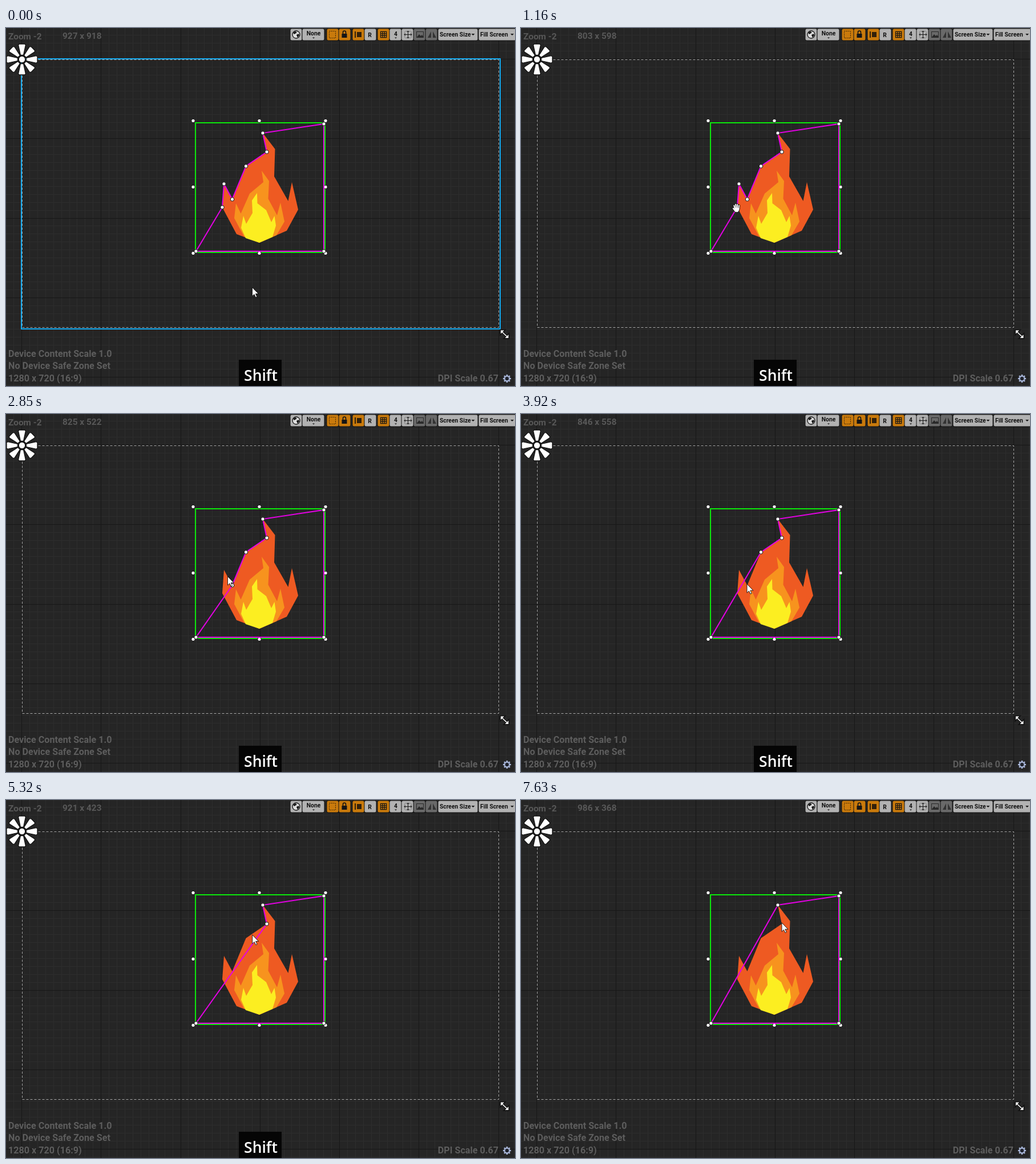
Animation of 892x627 px, one loop 7.71 s. Source, as an HTML page:

```html
<!DOCTYPE html>
<html lang="en">
<head>
<meta charset="utf-8">
<title>Editing a polygon outline</title>
<style>
  html, body { margin: 0; width: 100%; height: 100%; overflow: hidden; background: #252525; }
  svg { display: block; }
  text { font-family: Roboto, sans-serif; font-weight: 700; }
  .info { fill: #5d5d5d; font-size: 16.15px; }
  .top { fill: #585858; font-size: 15.4px; }
  .tool { fill: #111; font-size: 10.3px; }
  .key { fill: #fff; font: 600 26.5px "Open Sans", "Noto Sans", sans-serif; }
  .dot { fill: #fff; stroke: #111; stroke-width: 1; }
  .cursor { stroke-linejoin: round; stroke-linecap: round; }
</style>
</head>
<body>
<svg id="stage" width="892" height="627" viewBox="0 0 892 627"></svg>
<script>
const LOOP = 7710, STEPS = 100;
const INK = '#151515';
const stage = document.getElementById('stage');

function add(tag, attrs, parent = stage) {
  const el = document.createElementNS('http://www.w3.org/2000/svg', tag);
  for (const key in attrs) el.setAttribute(key, attrs[key]);
  parent.appendChild(el);
  return el;
}
const path = (d, attrs, parent) => add('path', { d, fill: 'none', ...attrs }, parent);
const box = (x, y, width, height, attrs, parent) =>
  add('rect', { x, y, width, height, ...attrs }, parent);
const frame = (x, y, w, h, stroke, attrs) => box(x, y, w, h, { fill: 'none', stroke, ...attrs });
const dot = (cx, cy) => add('circle', { cx, cy, r: 3.2, class: 'dot' });
const show = (el, on) => { el.style.display = on ? '' : 'none'; };
function label(x, y, str, cls, anchor = 'start') {
  const el = add('text', { x, y, class: cls, 'text-anchor': anchor });
  el.textContent = str;
  return el;
}

// Every tenth line of the background grid is dark
function drawGrid() {
  let minor = '', major = '';
  for (let k = -4; k < 64; k++) {
    const x = Math.round(27 + k * 13.925) + 0.5;
    const y = Math.round(54 + k * 13.925) + 0.5;
    const d = `M${x} 0V627M0 ${y}H892`;
    if (k % 10) minor += d; else major += d;
  }
  path(minor, { stroke: '#2d2d2d' });
  path(major, { stroke: '#171717' });
}

// One row of buttons, a colour letter for each
function buttons(left, letters, width = 21) {
  const colors = { l: '#b2b2b2', o: '#c97a0c', d: '#696969' };
  box(left - 0.5, 0.5, width * letters.length + 1, 22, { rx: 4, fill: INK });
  [...letters].forEach((c, i) =>
    box(left + i * width + 0.5, 1.5, width - 1, 20, { rx: 2.5, fill: colors[c] }));
}
const caret = (x, y, s) => path(`M${x - s} ${y}h${2 * s}l${-s} ${s}z`, { fill: INK });

function drawToolbar() {
  buttons(498, 'l');
  buttons(519, 'l', 39);
  buttons(562, 'oo');
  buttons(607, 'ol');
  buttons(651, 'olldd');
  buttons(757, 'l', 70);
  buttons(828, 'l', 66);
  label(539, 13, 'None', 'tool', 'middle');
  label(637.5, 15.5, 'R', 'tool', 'middle');
  label(683, 13.5, '4', 'tool', 'middle');
  label(760, 15, 'Screen Size', 'tool');
  label(831, 15, 'Fill Screen', 'tool');
  caret(539, 16.5, 2);
  caret(683, 16.5, 2);
  caret(818.5, 10, 3);
  caret(887, 10, 3);

  // globe, dashed frame, padlock, layout block
  add('circle', { cx: 508.5, cy: 11.5, r: 6.5, fill: '#ddd', stroke: INK, 'stroke-width': 1.3 });
  path('M503 8l4-2 3 2-5 3zM509 12l4-2 1 3-3 4z', { fill: INK });
  frame(566.5, 5.5, 11, 12, '#3a2408', { 'stroke-dasharray': '2 1.5' });
  box(588.5, 10, 9, 7, { fill: INK });
  path('M590.5 10V7.5a2.5 2.5 0 0 1 5 0V10', { stroke: INK, 'stroke-width': 1.6 });
  box(611, 6, 2, 11, { fill: '#33210a' });
  box(615, 7, 8, 9, { fill: '#33210a' });

  // snap grid, move, picture, mirror
  for (let i = 0; i < 4; i++) {
    const p = i * 3.4;
    path(`M656 ${6.4 + p}h11.2M${656.5 + p} 6v11`, { stroke: INK, 'stroke-width': 1.2 });
  }
  frame(698.5, 5.5, 12, 12, '#777', { rx: 2, 'stroke-width': 0.8 });
  for (let i = 0; i < 4; i++)
    path('M0 0V-6.5M-2 -4.5L0 -6.5 2 -4.5',
      { stroke: INK, transform: `translate(704.5 11.5) rotate(${i * 90})` });
  frame(719.5, 6.5, 12, 10, '#292929');
  path('M720 16l4-5 3 3 2-2 3 4z', { fill: '#292929' });
  path('M745 6v11h-6zM748 6v11h6z', { fill: '#333' });
}

function drawAnchor() {
  const g = add('g', { transform: 'translate(28 55)', stroke: '#111', 'stroke-width': 1.3 });
  for (let i = 0; i < 8; i++)
    path('M-2.6 -7.5L-6.4 -25 -5 -27H5L6.4 -25 2.6 -7.5z',
      { fill: '#fff', transform: `rotate(${i * 45})` }, g);
  add('circle', { r: 5.8, fill: '#fff' }, g);
}

function drawCorner() {
  const heads = 'M867 529.5h6l-6 6zM880.5 543h-6l6-6z';
  path('M869.5 532.5l8 7.5' + heads, { stroke: '#111', 'stroke-width': 3.5 });
  path('M869.5 532.5l8 7.5', { stroke: '#fff', 'stroke-width': 1.7 });
  path(heads, { fill: '#fff' });
  const gear = add('g', { transform: 'translate(878 614)', stroke: '#a9b7da' });
  for (let i = 0; i < 8; i++)
    path('M0 -4.5V-7', { 'stroke-width': 2.6, transform: `rotate(${i * 45})` }, gear);
  add('circle', { r: 4.2, fill: '#20242e', 'stroke-width': 2 }, gear);
}

// The outline runs round the image frame, then down the left edge of the flame
const edge = [[450, 184], [457, 217], [420.5, 242], [396.5, 300], [382, 273], [379, 314]];
const corners = [[333, 391], [557, 391], [557, 168], ...edge];

function drawFlame() {
  const fill = (color, points) => add('polygon', { points, fill: color });
  fill('#ee5a22', edge + ' 404,361 444,376 492,355 512,318 501,270 494.5,303 470,260 471.5,212');
  fill('#f7931e', '444,376 417,365 400,333 403,307 411.5,325 427,290 451,270 448,250 461,268 459.5,299 475,328 481,306 488,339 474,363');
  fill('#fcee21', '444,376 420,368 412,350 416,329 421,343 432,324 431,302 440,289 440.5,307 456,319 465,340 470.5,329 473,346 467,366');
}

drawGrid();
const hover = frame(27, 54, 839, 473, '#13aaf0', { 'stroke-width': 2 });
frame(28.5, 55.5, 835, 469, '#a9a9a9', { 'stroke-dasharray': '4 3' });
drawAnchor();
label(4, 19.5, 'Zoom -2', 'info top');
const readout = label(99, 18.5, '', 'info top');
['Device Content Scale 1.0', 'No Device Safe Zone Set', '1280 x 720 (16:9)']
  .forEach((str, i) => label(4, 575.5 + i * 21.7, str, 'info'));
label(863, 619, 'DPI Scale 0.67', 'info', 'end');
drawToolbar();
drawCorner();
drawFlame();

frame(332, 166, 227, 227, '#0be80b', { 'stroke-width': 2 });
for (let i = 0; i < 9; i++)
  if (i !== 4) dot(328 + i % 3 * 116, 162.5 + Math.floor(i / 3) * 116);

const outline = add('polygon', { fill: 'none', stroke: '#e400e4', 'stroke-width': 2 });
const dots = corners.map(([x, y]) => dot(x, y));

const shift = add('g', {});
box(408, 581, 75, 46, { fill: '#050505' }, shift);
shift.appendChild(label(446.5, 617.5, 'Shift', 'key', 'middle'));

const arrow = add('g', { class: 'cursor' });
path('M0 0V15.2L3.5 12 6 17.2 8.3 16.2 5.9 11H10.6Z',
  { fill: '#fff', stroke: INK, 'stroke-width': 0.9 }, arrow);

const hand = add('g', { class: 'cursor' });
const fingers = 'M-4 -4L-2.5 2M-1.3 -6L-0.7 1M1.6 -5.8L1.5 1M4.6 -4L4 2M-5.5 1L-2.5 4.5';
const palm = 'M-3 1H4.5L4 4 2.5 6.5H-1.5L-3.5 3.5Z';
for (const [color, w] of [[INK, 3.8], ['#fff', 2]]) {
  path(fingers, { stroke: color, 'stroke-width': w }, hand);
  path(palm, { fill: color, stroke: color, 'stroke-width': w - 0.6 }, hand);
}

// Each visit takes the last corner off the outline; times count in steps
const home = { x: 431.5, y: 454.5 };
const visits = [
  { x: 377.4, y: 315, leave: 0, arrive: 12, cut: 20 },
  { x: 383, y: 275, leave: 23, arrive: 31, cut: 33 },
  { x: 396, y: 298, leave: 36, arrive: 42, cut: 49 },
  { x: 421, y: 245.5, leave: 53, arrive: 59, cut: 63 },
  { x: 457, y: 215.3, leave: 68, arrive: 77, cut: 80 }
];
const easeOut = u => 1 - (1 - u) ** 3;

function pointer(step) {
  let { x, y } = home;
  for (const v of visits) {
    const u = (step - v.leave) / (v.arrive - v.leave);
    const e = easeOut(Math.min(1, Math.max(0, u)));
    x += (v.x - x) * e;
    y += (v.y - y) * e;
  }
  return { x, y };
}

function render(ms) {
  const step = Math.min(STEPS - 1, Math.floor((ms + 15) / (LOOP / STEPS)));
  const { x, y } = pointer(step);
  const seen = pointer(step - 0.3);
  const left = corners.length - visits.filter(v => step >= v.cut).length;
  const grab = visits.some(v => step >= v.arrive - 1 && step <= v.cut);

  outline.setAttribute('points', corners.slice(0, left).join(' '));
  dots.forEach((d, i) => show(d, i < left));
  readout.textContent = `${Math.round(2.3 * seen.x - 65)} x ${Math.round(2.3 * seen.y - 127)}`;
  show(hover, y > 393);
  show(shift, step < STEPS - 1);
  show(arrow, !grab);
  show(hand, grab);
  (grab ? hand : arrow).setAttribute('transform', `translate(${x} ${y})`);
}

const start = performance.now();
function tick() {
  render((performance.now() - start) % LOOP);
  requestAnimationFrame(tick);
}
tick();
</script>
</body>
</html>
```
